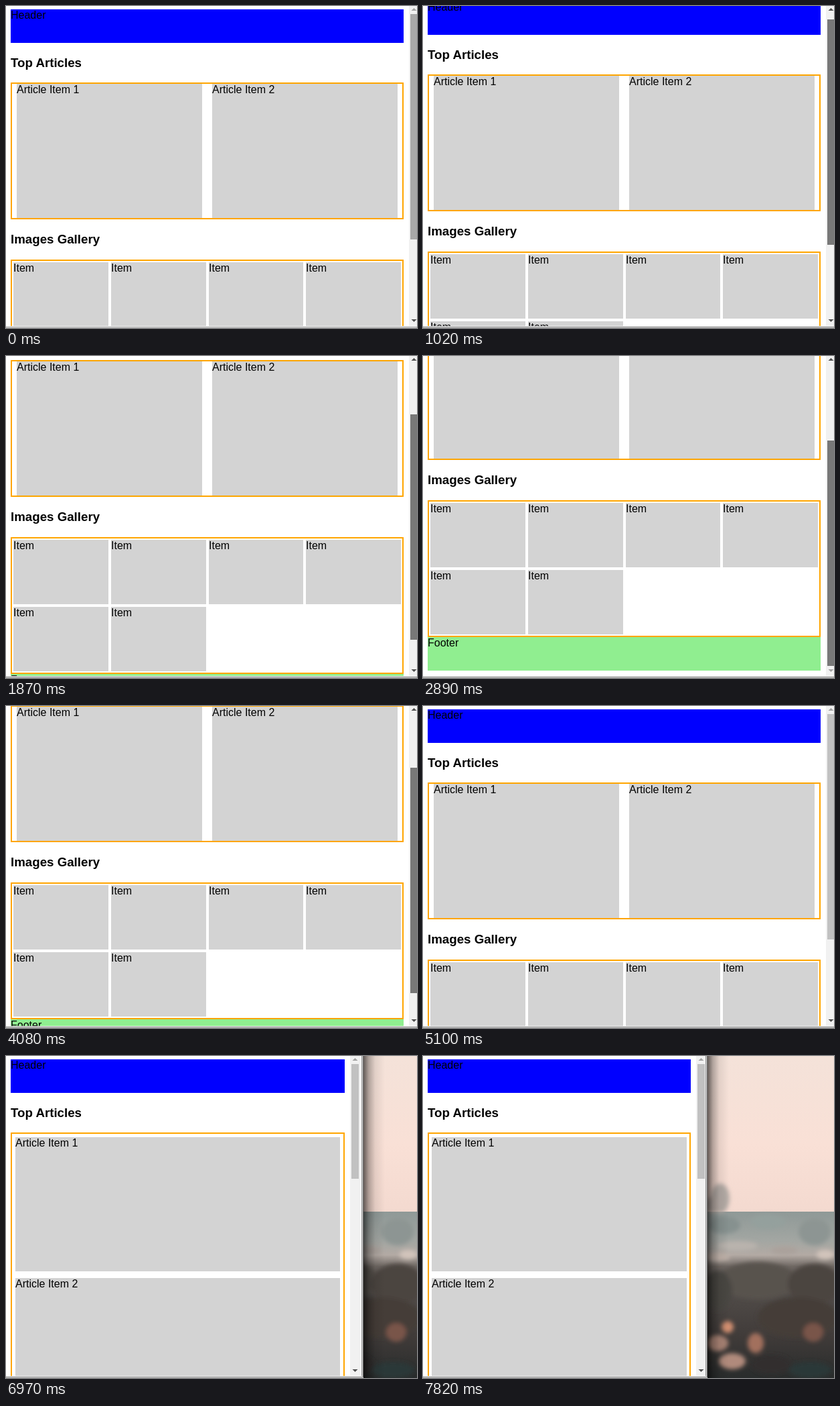
Animation of 614 by 480 pixels, one loop 7.99 s. Source, as an HTML page:

```html
<!DOCTYPE html>
<html lang="en">
<head>
<meta charset="utf-8">
<title>Responsive page</title>
<style>
html, body { margin: 0; width: 100%; height: 100%; overflow: hidden; background: #fff; }
svg { display: block; width: 614px; height: 480px; }
text { font: 16px "Liberation Sans", Arial, sans-serif; fill: #000; }
.title { font-size: 18.72px; font-weight: bold; }
.card { fill: #d3d3d3; }
.frame { fill: none; stroke: #ffa500; stroke-width: 2; }
</style>
</head>
<body>
<svg id="stage" viewBox="0 0 614 480">
  <defs>
    <linearGradient id="sky" x2="0" y2="1">
      <stop offset="0" stop-color="#f4e2d9"/>
      <stop offset=".55" stop-color="#f9e0d6"/>
      <stop offset="1" stop-color="#f3d9cf"/>
    </linearGradient>
    <linearGradient id="land" x2="0" y2="1">
      <stop offset="0" stop-color="#8f9997"/>
      <stop offset=".17" stop-color="#a2a6a2"/>
      <stop offset=".26" stop-color="#b3aaa4"/>
      <stop offset=".33" stop-color="#6f6863"/>
      <stop offset=".5" stop-color="#504b48"/>
      <stop offset=".75" stop-color="#403b39"/>
      <stop offset="1" stop-color="#292c2c"/>
    </linearGradient>
    <linearGradient id="shade">
      <stop offset="0" stop-opacity=".6"/>
      <stop offset=".25" stop-opacity=".28"/>
      <stop offset=".55" stop-opacity=".08"/>
      <stop offset="1" stop-opacity="0"/>
    </linearGradient>
    <filter id="soft" x="-50%" y="-50%" width="200%" height="200%"><feGaussianBlur stdDeviation="3"/></filter>
    <clipPath id="view"><rect width="614" height="477"/></clipPath>
  </defs>
  <g id="photo">
    <rect x="380" width="234" height="240" fill="url(#sky)"/>
    <rect x="380" y="232" width="234" height="248" fill="url(#land)"/>
    <g id="blobs" filter="url(#soft)"></g>
  </g>
  <rect id="shadow" width="32" height="480" fill="url(#shade)"/>
  <rect id="sheet" height="480" fill="#fff"/>
  <g clip-path="url(#view)"><g id="page"></g></g>
  <g id="bar"></g>
  <g id="edge"></g>
</svg>
<script>
const TICK = 170, LOOP = 7990;
const $ = id => document.getElementById(id);

function add(parent, tag, attrs, label) {
  const el = document.createElementNS("http://www.w3.org/2000/svg", tag);
  if (label) el.textContent = label;
  parent.append(el);
  return set(el, attrs);
}
function set(el, attrs) {
  for (const k in attrs) el.setAttribute(k, attrs[k]);
  return el;
}
// Place a rectangle on whole pixels, given its left and right sides.
function span(el, left, right) {
  const x = Math.round(left);
  set(el, { x, width: Math.round(right) - x });
  return x;
}

// Keys are [tick, value]
const SCROLL = [[4, 0], [6, 12], [11, 108], [13, 142], [16, 142], [17, 163], [23, 163], [24, 115], [27, 0]];
const WIDTH = [[36, 602], [41, 514], [42, 514], [46, 408]];
const EDGE = [[36, 621], [41, 534], [42, 534], [46, 425]];
const THUMB = [[0, "#a8a8a8"], [4, "#787878"], [30, "#c1c1c1"], [32, "#a8a8a8"], [33, "#c1c1c1"]];

function tween(keys, n) {
  const i = keys.findIndex(k => k[0] >= n);
  if (i < 0) return keys[keys.length - 1][1];
  if (i === 0) return keys[0][1];
  const [a, p] = keys[i - 1], [b, q] = keys[i];
  return Math.round(p + (q - p) * (n - a) / (b - a));
}
const latest = (keys, n) => keys.filter(k => k[0] <= n).pop()[1];

// Blurred city: x, y, rx, ry, colour
[
  [444, 212, 14, 22, "#b3aaa5"], [432, 222, 12, 12, "#b8aca6"],
  [450, 252, 24, 13, "#86918f"], [515, 247, 26, 11, "#94a09d"], [585, 262, 24, 20, "#8d9593"],
  [470, 283, 30, 7, "#b9b3ad"], [540, 290, 20, 6, "#aaa19b"], [601, 296, 13, 7, "#d2c4bb"],
  [440, 300, 18, 6, "#c2b4ab"], [500, 335, 60, 28, "#58524e"], [585, 340, 40, 30, "#4b4441"],
  [440, 350, 22, 30, "#494643"], [560, 390, 60, 30, "#453c39"], [583, 412, 15, 14, "#79554a"],
  [497, 428, 12, 15, "#a2705d"], [440, 428, 16, 12, "#a98374"], [462, 455, 20, 12, "#b08a7b"],
  [520, 460, 30, 14, "#332f2e"], [578, 468, 32, 12, "#2c3938"], [455, 404, 9, 9, "#d18e70"]
].forEach(([cx, cy, rx, ry, fill]) => add($("blobs"), "ellipse", { cx, cy, rx, ry, fill }));

const page = $("page");
const label = (x, y, s, g = page) => add(g, "text", { x, y }, s);
const title = (y, s, g) => label(7, y, s, g).classList.add("title");
const card = (g, y, height, s) => ({
  box: add(g, "rect", { class: "card", y, height }),
  text: label(0, y + 14, s, g)
});

const header = add(page, "rect", { x: 7, y: 5, height: 50, fill: "#00f" });
label(7, 19, "Header");
title(91, "Top Articles");
const topFrame = add(page, "rect", { class: "frame", x: 8, y: 115 });
const articles = [1, 2].map(n => card(page, 116, 200, "Article Item " + n));

const lower = add(page, "g", {});
title(354, "Images Gallery", lower);
const gallery = add(lower, "rect", { class: "frame", x: 8, y: 379, height: 202 });
const items = Array.from({ length: 6 }, (_, i) => card(lower, i < 4 ? 382 : 482, 96, "Item"));
const footer = add(lower, "rect", { x: 7, y: 582, height: 50, fill: "#90ee90" });
label(7, 596, "Footer", lower);

const bar = $("bar");
add(bar, "rect", { width: 15, height: 477, fill: "#f1f1f1" });
const thumb = add(bar, "rect", { x: 2, width: 11 });
const up = add(bar, "path", { d: "M3.5 7h8l-4-4z" });
const down = add(bar, "path", { d: "M3.5 467h8l-4 4z" });

const edge = $("edge");
["#8c8c8c", "#dcdcdc", "#6a6a6a"].forEach((fill, i) =>
  add(edge, "rect", { x: i - 3, width: 1, height: 480, fill }));
const base = add(edge, "rect", { x: -640, y: 478, width: 640, height: 1 });
add(edge, "rect", { x: -640, y: 479, width: 640, height: 1, fill: "#cfcfcf" });
add(edge, "rect", { x: -640, y: 477, width: 638, height: 1, fill: "#f2f2f2" });

function render(ms) {
  const n = Math.floor(ms % LOOP / TICK);
  const scroll = tween(SCROLL, n), view = tween(WIDTH, n), right = tween(EDGE, n);
  const narrow = view < 580;
  const inner = view - 19, full = view - 15;

  set(page, { transform: `translate(0 ${-scroll})` });
  set(lower, { transform: `translate(0 ${narrow ? 220 : 0})` });
  [header, footer].forEach(el => set(el, { width: full }));
  set(topFrame, { width: full - 2, height: narrow ? 422 : 202 });
  set(gallery, { width: full - 2 });

  articles.forEach(({ box, text }, i) => {
    const left = 9 + inner * (narrow ? .01 : .0125 + .5 * i);
    const y = narrow ? 121 + 210 * i : 116;
    const x = span(box, left, left + inner * (narrow ? .98 : .475));
    set(box, { y });
    set(text, { x, y: y + 14 });
  });
  items.forEach(({ box, text }, i) => {
    const left = 11 + inner / 4 * (i % 4);
    set(text, { x: span(box, left, left + inner / 4 - 4) });
  });

  set(bar, { transform: `translate(${view} 0)` });
  set(thumb, { y: Math.round(12 + scroll * .697), height: narrow ? 171 : 336, fill: latest(THUMB, n) });
  set(up, { fill: scroll > 0 ? "#505050" : "#a3a3a3" });
  set(down, { fill: scroll < 163 ? "#505050" : "#a3a3a3" });

  set($("sheet"), { width: right });
  set($("shadow"), { x: right });
  set(edge, { transform: `translate(${right} 0)` });
  set(base, { fill: n < 4 ? "#a8a8a8" : "#868686" });
}

const start = performance.now();
function loop() {
  render(performance.now() - start);
  requestAnimationFrame(loop);
}
loop();
</script>
</body>
</html>
```
